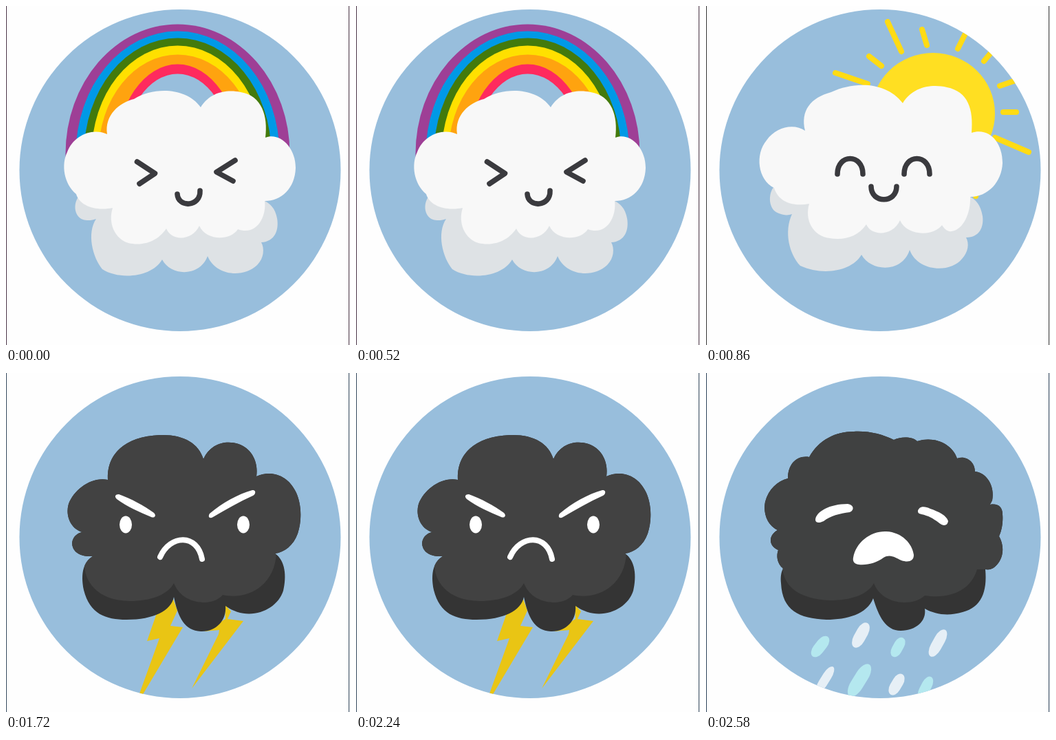
An HTML page for the animation above (3.44 s loop, 500 by 492 pixels).

```html
<!DOCTYPE html>
<html lang="en">
<head>
<meta charset="utf-8">
<title>Cloud moods</title>
<style>
  html, body { margin: 0; width: 100%; height: 100%; overflow: hidden; background: #fefefe; }
  svg { display: block; width: 100vw; height: 100vh; }
  .scene { display: none; }
  .scene.on { display: inline; }
  .line { fill: none; stroke-linecap: round; stroke-linejoin: round; }
  .ink { stroke: #3a3a3e; stroke-width: 7.6; }
  .chalk { stroke: #fff; stroke-width: 8; }
  .puff { fill: #f8f8f8; }
  .under { fill: #dee2e5; }
  .bolt { fill: #e9c514; }
</style>
</head>
<body>
<svg viewBox="0 0 500 492">
  <defs>
    <clipPath id="disc"><circle cx="253" cy="238.5" r="233.5"/></clipPath>
    <clipPath id="arch"><rect width="500" height="225"/></clipPath>
    <path id="angry" d="M148 155C146 120 170 92 224 90C258 89 280 102 287 125C297 103 318 97 338 103C358 110 367 130 364 150C386 140 410 149 421 172C429 188 431 212 424 233C418 250 405 260 391 262C406 272 408 295 403 316C394 345 352 362 319 338C321 360 304 376 283 375C260 374 250 355 244 325C240 345 215 358 175 358C145 358 122 350 113 315C108 290 113 274 126 266C105 267 96 258 96 246C98 236 105 232 111 231C94 226 86 207 91 190C99 169 124 150 148 155Z"/>
    <path id="sad" d="M150 122C164 97 188 85 215 85C238 84 256 89 273 97C283 92 300 92 307 99C332 91 358 103 365 124C378 119 391 129 391 143C409 145 420 165 416 185C414 189 413 190 413 191C424 189 431 194 431 205C432 217 430 228 426 237C435 253 432 272 419 282C415 285 410 286 406 285C409 318 400 340 373 347C353 353 334 351 318 342C321 360 305 374 283 374C261 374 251 353 243 327C234 350 205 358 175 358C135 356 111 345 109 305C108 297 109 289 112 284C103 276 102 265 105 257C91 251 90 236 104 228C88 220 83 202 86 187C91 168 104 157 119 153C119 132 132 119 150 122Z"/>
    <clipPath id="angryClip"><use href="#angry"/></clipPath>
    <clipPath id="sadClip"><use href="#sad"/></clipPath>
  </defs>
  <g clip-path="url(#disc)">
    <rect width="500" height="492" fill="#98bedc"/>

    <g class="scene">
      <g id="rainbow" clip-path="url(#arch)"></g>
      <path class="under" d="M108 274C97 284 98 305 112 310C118 312 126 311 131 309C117 330 126 365 140 382C165 398 212 394 227 368C240 393 282 393 293 363C305 392 345 395 365 376C375 366 376 352 371 343C391 342 397 325 394 308C391 293 384 287 376 283Z"/>
      <path class="puff" d="M155 293C130 298 107 290 102 273C84 258 80 230 89 212C98 188 125 176 147 186C143 158 165 140 186 135C215 117 262 118 283 147C297 124 322 121 341 125C372 130 381 160 377 191C398 183 421 205 421 235C420 265 400 283 376 283C379 305 365 334 337 324C325 342 290 340 281 319C270 342 240 341 233 323C218 345 195 348 178 344C158 338 148 315 155 293Z"/>
      <path class="line ink" d="M190.5 226L216.5 243L194 258M333 224L306 241L330 254M249 273C250 293 283 292 282 268"/>
    </g>

    <g class="scene">
      <ellipse cx="330" cy="156" rx="90" ry="88" fill="#ffdf22"/>
      <path class="line" stroke="#ffdb14" stroke-width="8" d="M264 23L284 66M314 34L321 57M377 40L366 62M414 68L404 80M427 116L450 108M432 154H451M420 191L469 212M237 73L255 87M188 97L235 113M392 270V276"/>
      <path class="under" d="M99 262C90 272 90 296 106 301C113 304 120 304 125 302C113 328 121 360 137 377C170 392 212 385 226 361C240 386 285 388 296 354C308 386 355 388 372 367C381 357 383 345 378 336C398 336 404 320 402 305C399 288 392 281 384 277Z"/>
      <path class="puff" d="M150 287C128 291 106 286 99 264C75 252 71 215 88 195C102 175 128 170 144 181C137 152 152 133 182 125C217 109 262 110 286 141C301 117 328 113 350 118C381 124 389 150 386 184C412 176 431 198 431 228C430 255 410 277 384 277C385 300 374 325 357 327C351 328 346 323 343 318C330 335 292 334 282 311C271 335 240 334 233 317C220 336 200 340 180 337C155 334 143 310 150 287Z"/>
      <path class="line ink" d="M191 244C191 214 228 214 228 244M288 244C288 214 325 214 325 244M240 262C240 287 277 287 277 262"/>
    </g>

    <g class="scene">
      <path class="bolt" d="M243 328L220 346L205 389L223 385L193 468H198L257 369L239 367L249 345Z"/>
      <path class="bolt" d="M318 336L319 357L288 375L310 373L309 379L270 458L345 360L322 357L327 346Z"/>
      <use href="#angry" fill="#343434"/>
      <path clip-path="url(#angryClip)" fill="#424242" d="M0 0H500V262H393C390 310 350 330 315 322C310 328 302 332 290 333C270 333 252 325 244 305C235 322 210 331 180 331C130 330 112 300 114 272H0Z"/>
      <g fill="#fff">
        <path d="M164 176C181 182 200 192 215 203C219 207 216 211 211 209C194 202 176 194 161 183C157 179 159 176 164 176Z"/>
        <path d="M358 170C337 176 315 188 296 204C293 209 296 212 301 209C320 198 339 187 359 178C364 175 363 169 358 170Z"/>
        <ellipse cx="174" cy="220" rx="9" ry="12.5"/>
        <ellipse cx="345" cy="220" rx="9" ry="12.5"/>
      </g>
      <path class="line chalk" d="M224 267C239 234 278 233 285 270"/>
    </g>

    <g class="scene">
      <g id="rain"></g>
      <use href="#sad" fill="#343434"/>
      <path clip-path="url(#sadClip)" fill="#404141" d="M0 0H500V285H394C386 312 360 329 318 323C310 330 300 333 288 333C268 333 250 322 244 305C235 322 210 330 180 330C135 328 113 310 111 282H0Z"/>
      <g fill="#fff">
        <path d="M159 213C160 201 180 190 206 190C215 191 216 199 209 202C194 204 181 207 171 215C165 218 159 218 159 213Z"/>
        <path d="M308 200C310 193 318 193 326 197C338 201 350 207 352 215C351 222 345 223 338 217C330 211 323 207 313 205C309 204 308 203 308 200Z"/>
        <path d="M214 268C218 245 240 229 262 230C285 231 300 248 302 264C302 274 293 275 284 272C275 268 268 262 258 268C247 276 235 279 222 278C215 277 213 273 214 268Z"/>
      </g>
    </g>
  </g>
  <path id="edges" fill="none" d="M.5 0V492M498.5 0V492"/>
</svg>
<script>
const STEP = 860;
const EDGES = ['#4a3446', '#333333', '#33485c', '#2b4058'];
const scenes = document.querySelectorAll('.scene');
const edges = document.getElementById('edges');

function add(parent, tag, attrs) {
  const el = document.createElementNS('http://www.w3.org/2000/svg', tag);
  for (const key in attrs) el.setAttribute(key, attrs[key]);
  document.getElementById(parent).append(el);
}

// Nested arches, outermost first: radius x, radius y, colour
[
  [163, 188, '#9e3f96'], [148, 178, '#0099e6'], [136, 168, '#437a0c'],
  [125, 157, '#ffe000'], [115, 144, '#ffa30f'], [89, 130, '#ff2a5e'],
  [78, 116, '#98bedc']
].forEach(([rx, ry, fill]) => add('rainbow', 'ellipse', { cx: 249.5, cy: 214.5, rx, ry, fill }));

// Centre x, centre y, width, length, tilt, cyan or pale
[
  [166, 397, 16, 36, 38, 1], [225, 380.5, 17, 40, 29, 0],
  [279, 398, 15, 31, 29, 1], [337, 392, 16, 44, 29, 0],
  [173, 445, 13, 44, 32, 0], [223, 446, 19, 54, 32, 1],
  [277, 452, 16, 34, 30, 0], [319, 457, 15, 36, 27, 1]
].forEach(([cx, cy, w, h, tilt, cyan]) => add('rain', 'rect', {
  x: cx - w / 2, y: cy - h / 2, width: w, height: h, rx: w / 2, ry: h * 0.36,
  fill: cyan ? '#b4e8ef' : '#e6eff6', transform: `rotate(${tilt} ${cx} ${cy})`
}));

const start = performance.now();
function draw() {
  const now = Math.floor((performance.now() - start) / STEP) % scenes.length;
  scenes.forEach((scene, i) => scene.classList.toggle('on', i === now));
  edges.setAttribute('stroke', EDGES[now]);
  requestAnimationFrame(draw);
}
draw();
</script>
</body>
</html>
```
